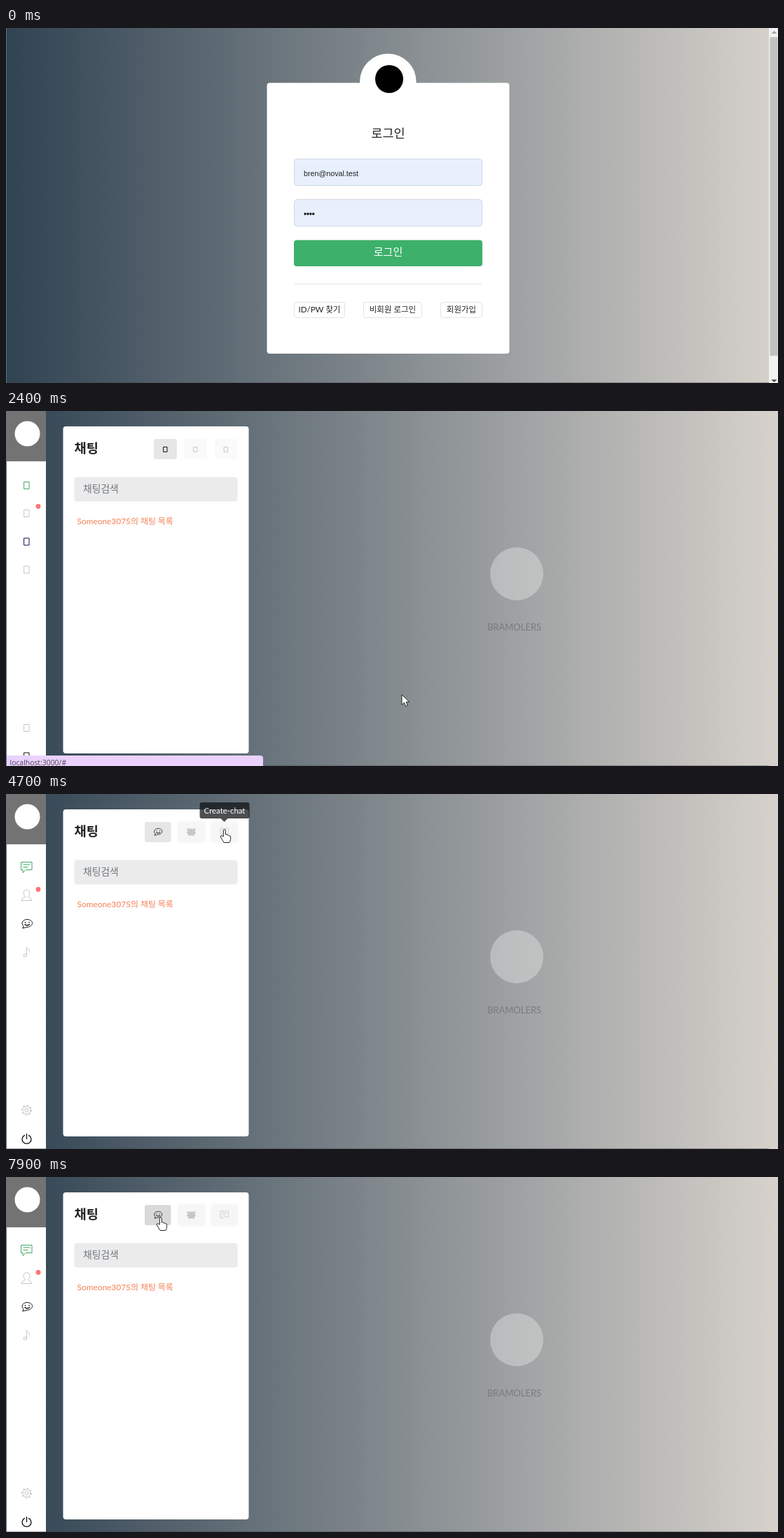
Animation, 1102 px wide and 508 px high, one loop 8 s. Source, as an HTML page:

```html
<!DOCTYPE html>
<html lang="ko">
<head>
<meta charset="utf-8">
<title>Login and chat</title>
<style>
  html, body { margin: 0; width: 100%; height: 100%; overflow: hidden; }
  #stage {
    position: relative; width: 1102px; height: 508px; overflow: hidden;
    background: linear-gradient(90deg, #304352, #d7d2cc);
    font-family: Lato, "Noto Sans CJK KR", "Noto Sans CJK", sans-serif;
  }
  svg { position: absolute; left: 0; top: 0; display: block; }
  .off { display: none; }
  text { fill: #222; }
  .mid { text-anchor: middle; }
  .small { font-size: 11.5px; }
  .field { fill: #e8f0fe; stroke: #cfd6e0; }
  .link { fill: #fff; stroke: #e4e4e4; }
  .link.hot { fill: #e6e8ea; }
  .link.worn { fill: #f6f6f6; }
  .link.press { fill: #c4c4c4; stroke: #d9d9d9; stroke-width: 2; }
  .line { fill: none; stroke: currentColor; stroke-linecap: round; stroke-linejoin: round; }
  .pale { color: #c6c6c6; }
  .green { color: #3ca55f; }
  .dark { color: #111; }
  .dark.hot { color: #3ca55f; }
  .tab { fill: #fafafa; }
  .tab.worn { fill: #f6f6f6; stroke: #f8f8f8; stroke-width: 3; }
  .tab.main { fill: #e6e6e6; }
  .tab.hot { fill: #d9d9d9; }
  .tip {
    position: absolute; height: 23px; line-height: 23px; padding: 0 6px; border-radius: 3px;
    background: #111315; color: #fff; font-size: 11.4px; white-space: nowrap;
  }
  .tip::after { content: ""; position: absolute; border: 5px solid transparent; }
  .side::after { right: 100%; top: 6.5px; border-left-width: 0; border-right-color: #111315; }
  .top { transform: translateX(-50%); }
  .top::after { top: 100%; left: calc(50% - 5px); border-bottom-width: 0; border-top-color: #111315; }
  #status {
    position: absolute; left: 1px; top: 493px; height: 15px; line-height: 20px; padding-left: 4.5px;
    box-sizing: border-box; overflow: hidden; white-space: nowrap; border-radius: 0 4px 0 0;
    background: #ead2fd; color: #4b4354; font: 10.4px/20px "Open Sans", "Noto Sans", sans-serif;
  }
</style>
</head>
<body>
<div id="stage">
  <svg width="1102" height="508" viewBox="0 0 1102 508">
    <defs>
      <g id="chat" class="line">
        <path d="M-7.5-7h15V4H-1l-4.5 4V4h-2zM-4.5-3.5h9M-4.5 0h6"/>
      </g>
      <g id="user" class="line">
        <path d="M-2 2c-4-4-3-10 2-10s6 6 2 10c0 2 5 1 5.500 5.500h-15C-7 3-2 4-2 2z"/>
      </g>
      <g id="smile" class="line">
        <path d="M-5 3.500C-10-1-5-6 0-6s8 3 7.500 6S3 5 0 5L-6 6.500z"/>
        <path d="M-3 1c1.500 2 5 2 6.500 0M-2.500-2v.5M3-2v.5" stroke-width="1.3"/>
      </g>
      <g id="note" class="line">
        <path d="M0 4V-7c1 3 5 3 4 6.500"/><circle cx="-2.200" cy="4.500" r="2.200"/>
      </g>
      <g id="gear" class="line">
        <circle r="2.600"/><circle r="5.600"/>
        <circle r="6.800" stroke-width="1.800" stroke-dasharray="2 3.340" stroke-linecap="butt"/>
      </g>
      <g id="power" class="line" stroke-width="1.300">
        <path d="M-3-5.600a6.400 6.400 0 1 0 6 0M0-7.500V-.5"/>
      </g>
      <g id="crowd" fill="currentColor">
        <circle cx="-4" cy="-3" r="2"/><circle cx="4" cy="-3" r="2"/><circle cy="-2" r="2.600"/>
        <path d="M-6.500 2q0-3 3-3h7q3 0 3 3l-2 1v2.500h-9V3z"/>
      </g>
      <path id="box" class="line" d="M-3.500-5h7v10h-7z" style="stroke-linejoin:miter"/>
      <path id="minibox" class="line" d="M-2.500-3.500h5v7h-5z" style="stroke-linejoin:miter"/>
    </defs>

    <g data-on="0-2400">
      <path d="M1089 0h13v508h-13z" fill="#f1f1f1"/>
      <path d="M1090.500 13h11v456h-11z" fill="#c1c1c1"/>
      <path d="M1092.500 8l4-4 4 4z" fill="#a3a3a3"/>
      <path d="M1092.500 503l4 4 4-4z" fill="#505050"/>
      <rect x="372.500" y="78.500" width="346" height="387.500" rx="4" fill="#fff"/>
      <circle cx="545.300" cy="77" r="40.300" fill="#fff"/>
      <circle cx="547" cy="73" r="20" fill="#000"/>
      <text class="mid" x="545.500" y="157" font-size="17.500" font-weight="300">로그인</text>
      <rect class="field" x="411.500" y="187.500" width="268" height="38" rx="4"/>
      <rect class="field" x="411.500" y="245.500" width="268" height="38" rx="4"/>
      <g data-on="0-2200">
        <text x="425" y="212" font-size="10.700" font-family="Liberation Sans, Arial, sans-serif">bren@noval.test</text>
        <path d="M427 266h13" stroke="#111" stroke-width="3.400" stroke-linecap="round" stroke-dasharray="0 3.900"/>
      </g>
      <g data-on="2200-2400">
        <text x="425" y="212" font-size="16.300">bren@noval.test</text>
        <path d="M429 266h26" stroke="#111" stroke-width="7" stroke-linecap="round" stroke-dasharray="0 8.500"/>
      </g>
      <rect x="411" y="303.500" width="269" height="37.500" rx="4" fill="#3db06b"/>
      <text class="mid" x="545.500" y="325.500" font-size="15" font-weight="500" style="fill:#fff">로그인</text>
      <path d="M411 366.500h269" stroke="#e6e6e6"/>
      <rect class="link" x="411.500" y="392.500" width="72" height="22" rx="2.500"/>
      <rect class="link" data-hot="1900-2300" data-press="2300-2400" x="510.500" y="392.500" width="83" height="22" rx="2.500"/>
      <rect class="link" data-hot="800-1100" data-worn="1100-2400" x="620.500" y="392.500" width="59" height="22" rx="2.500"/>
      <g class="small mid">
        <text x="447.500" y="407">ID/PW 찾기</text>
        <text x="552" y="407">비회원 로그인</text>
        <text x="650" y="407">회원가입</text>
      </g>
    </g>

    <g data-on="2400-8000">
      <path d="M1 0h56v508H1z" fill="#fff"/>
      <path d="M1 0h56v72H1z" fill="#737373"/>
      <circle cx="30.500" cy="32.500" r="18" fill="#fff"/>
      <circle cx="46" cy="136.500" r="3.400" fill="#ff7373"/>
      <rect x="81.500" y="22" width="265" height="468" rx="4" fill="#fff"/>
      <text x="97.500" y="60" font-size="18.700" font-weight="700">채팅</text>
      <rect x="97.500" y="94.500" width="233" height="35" rx="4" fill="#ebebeb"/>
      <text x="110" y="116" font-size="13.800" font-weight="300" style="fill:#6f7780">채팅검색</text>
      <text x="101.500" y="162" font-size="11.900" style="fill:#f57f54">Someone3075의 채팅 목록</text>
      <circle cx="729" cy="233" r="38" fill="#fff" fill-opacity=".31"/>
      <text class="mid" x="725.500" y="313.500" font-size="13" style="fill:#7d797d">BRAMOLERS</text>

      <g data-on="2400-2600">
        <use href="#box" x="29.500" y="106.500" class="green"/>
        <use href="#box" x="29.500" y="146.500" class="pale"/>
        <use href="#box" x="29.500" y="187" color="#10104a"/>
        <use href="#box" x="29.500" y="227" class="pale"/>
        <use href="#box" x="29.500" y="453.500" class="pale"/>
        <use href="#box" x="29.500" y="494" class="dark"/>
        <rect class="tab main" x="211" y="40" width="33" height="29" rx="3"/>
        <rect class="tab" x="254" y="40" width="33" height="29" rx="3"/>
        <rect class="tab" x="298" y="40" width="33" height="29" rx="3"/>
        <use href="#minibox" x="227.500" y="55" class="dark"/>
        <use href="#minibox" x="270.500" y="55" class="pale"/>
        <use href="#minibox" x="314" y="55" class="pale"/>
      </g>
      <g data-on="2600-8000">
        <use href="#chat" x="29.500" y="104.500" class="green"/>
        <use href="#user" x="29.500" y="145" class="pale"/>
        <use href="#smile" x="30" y="185.500" class="dark" data-hot="3400-3900 5900-6200"/>
        <use href="#note" x="29.500" y="226.500" class="pale"/>
        <use href="#gear" x="29.500" y="452.500" class="pale"/>
        <use href="#power" x="29.500" y="494" class="dark"/>
        <rect class="tab main" data-hot="5000-5100 7900-8000" x="198" y="40" width="37.500" height="29" rx="3"/>
        <rect class="tab" data-worn="4400-8000" x="246" y="40" width="38" height="29" rx="3"/>
        <rect class="tab" data-worn="4600-8000" x="293.500" y="40" width="37" height="29" rx="3"/>
        <use href="#smile" transform="translate(217 54) scale(.78)" class="dark"/>
        <use href="#crowd" x="264.500" y="54" class="pale"/>
        <use href="#chat" transform="translate(312 54) scale(.75)" class="pale"/>
      </g>
    </g>
    <path d="M.5 0v508" stroke="#587880"/>
    <path d="M1 507.500h1088" stroke="#44444f" stroke-opacity=".45"/>
  </svg>

  <div id="status"></div>
  <div id="tips"></div>

  <svg width="1102" height="508" viewBox="0 0 1102 508">
    <g id="cursor" stroke-linejoin="round">
      <path id="arrow" d="M0 0v14.500l3.400-3.200 2.400 5.200 2.600-1.100-2.300-5.100h4.700z" fill="#fff" stroke="#222"/>
      <path id="hand" d="M-1.700 10V1.200q0-1.400 1.500-1.400t1.500 1.400V7q2.300-.9 2.700.9 2-.7 2.500.9 2-.4 2.100 1.500v3.200q0 2.300-1.800 5H-.8L-5.500 11q-1-1.700.3-2.200t2.300.8z" fill="#fff" stroke="#222"/>
      <path id="beam" d="M-4.500-7.500h3.500l1 1 1-1h3.500M0-6.500v13M-4.500 7.500h3.500l1-1 1 1h3.500" fill="none" stroke="#d9d9d9" stroke-width="1.200"/>
    </g>
  </svg>
</div>

<script>
  const LOOP = 8000, STEP = 100;
  const $ = id => document.getElementById(id);

  // Pointer stops: time, x, y; the shape holds until another one is named.
  const path = [
    [100, 1085, 50, "arrow"], [400, 850, 230], [700, 690, 380], [800, 648, 396, "hand"],
    [1000, 645, 394], [1100, 637, 373, "arrow"], [1200, 637, 373], [1300, 611, 336, "hand"],
    [1500, 600, 362, "arrow"], [1700, 583, 384], [1900, 562, 401, "hand"], [2100, 556, 403, "arrow"],
    [2300, 556, 403], [2400, 565, 406], [2500, 565, 406], [3000, 260, 270], [3400, 33, 180, "hand"],
    [3600, 32, 180], [3800, 77, 133, "beam"], [4000, 140, 108], [4200, 225, 72, "arrow"],
    [4300, 258, 52, "hand"], [4400, 264, 50], [4600, 312, 50], [4700, 312, 51], [4900, 264, 52],
    [5000, 217, 53], [5100, 185, 56, "arrow"], [5200, 133, 58], [5400, 80, 108], [5600, 32, 144, "hand"],
    [5800, 32, 147], [5900, 31, 180], [6100, 31, 188], [6200, 30, 222], [6400, 28, 240, "arrow"],
    [6500, 28, 275], [6700, 33, 422], [6800, 30, 445, "hand"], [7000, 30, 450], [7300, 30, 450],
    [7400, 33, 445, "arrow"], [7600, 115, 193], [7700, 152, 84], [7800, 188, 66], [7900, 221, 58, "hand"]
  ];

  // Tooltips: start, end, label, side, left or centre, top.
  const tips = [
    [3400, 3900, "Open-chat", "side", 63, 174],
    [4400, 4600, "Group-chat", "top", 264, 12],
    [4600, 4800, "Create-chat", "top", 312, 12],
    [4800, 5000, "Group-chat", "top", 264, 12],
    [5000, 5100, "Open-chat", "top", 217, 12],
    [5600, 5900, "Friends", "side", 63, 134],
    [5900, 6200, "Open-chat", "side", 63, 174],
    [6200, 6400, "Music", "side", 63, 217],
    [6800, 7400, "Settings", "side", 63, 441]
  ];

  // Link preview: start, end, page, width, opacity.
  const links = [
    [800, 1800, "sign-up", 122, 1], [1800, 2200, "#", 122, 1], [2200, 2600, "#", 366, 1],
    [3500, 3800, "Open-chat", 120, 1], [3800, 3900, "Open-chat", 120, .45],
    [5700, 5900, "Friends", 120, 1], [5900, 6200, "Open-chat", 120, 1], [6200, 6400, "Music", 120, 1]
  ];

  const within = (t, spans) => spans.split(" ").some(s => {
    const [a, b] = s.split("-").map(Number);
    return t >= a && t < b;
  });

  const bubbles = tips.map(([, , label, side, x, y]) => {
    const el = document.createElement("div");
    el.className = "tip " + side;
    el.textContent = label;
    el.style.left = x + "px";
    el.style.top = y + "px";
    $("tips").append(el);
    return el;
  });

  const timed = [...document.querySelectorAll("[data-on],[data-hot],[data-worn],[data-press]")];

  function movePointer(t) {
    let i = 0;
    while (i < path.length - 1 && path[i + 1][0] <= t) i++;
    const a = path[i], b = path[i + 1] || a;
    const k = b === a ? 0 : Math.max(0, (t - a[0]) / (b[0] - a[0]));
    const at = n => a[n] + (b[n] - a[n]) * k;
    const shape = path.slice(0, i + 1).reverse().find(p => p[3])[3];
    $("cursor").setAttribute("transform", `translate(${at(1)} ${at(2)})`);
    $("cursor").classList.toggle("off", t < path[0][0]);
    for (const id of ["arrow", "hand", "beam"]) $(id).classList.toggle("off", id !== shape);
  }

  function draw(t) {
    for (const el of timed) {
      const { on, ...states } = el.dataset;
      if (on) el.classList.toggle("off", !within(t, on));
      for (const name in states) el.classList.toggle(name, within(t, states[name]));
    }
    tips.forEach(([from, to], i) => {
      const shown = t >= from && t < to;
      bubbles[i].style.opacity = shown ? Math.min(1, (t - from + 20) / 160) : 0;
    });
    const link = links.find(l => t >= l[0] && t < l[1]);
    $("status").classList.toggle("off", !link);
    if (link) {
      $("status").textContent = "localhost:3000/" + link[2];
      $("status").style.width = link[3] + "px";
      $("status").style.opacity = link[4];
    }
    movePointer(t);
  }

  const start = performance.now();
  function tick() {
    const t = (performance.now() - start) % LOOP;
    draw(Math.floor(t / STEP) * STEP);
    requestAnimationFrame(tick);
  }
  tick();
</script>
</body>
</html>
```
